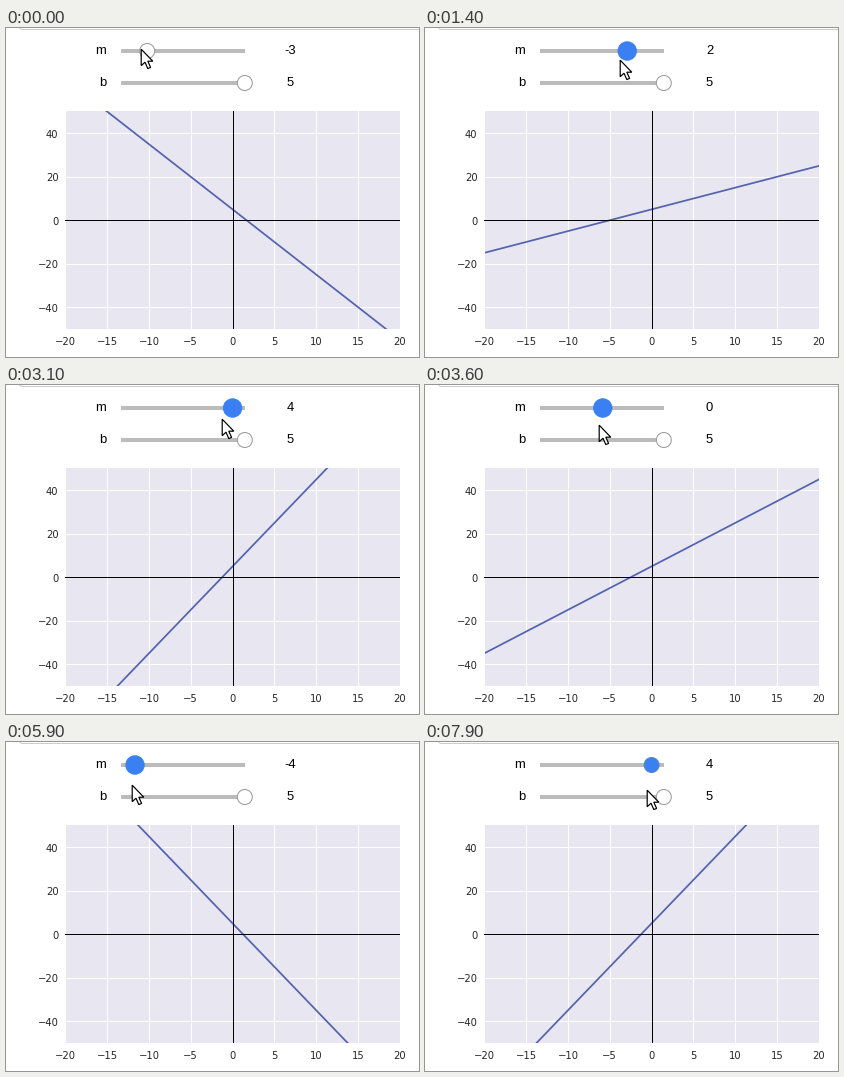
Recreate the animation shown at these times as a matplotlib script. Size 413 by 329 pixels, loop 8000 ms.

```python
import numpy as np
import matplotlib.pyplot as plt
from matplotlib.animation import FuncAnimation
from matplotlib.patches import Circle, PathPatch, Polygon, Rectangle
from matplotlib.path import Path

W, H, DPI = 413, 329, 64
PT = 72 / DPI  # points per pixel
STEP_MS, FRAMES = 100, 80
LEFT, RIGHT, TOP, BOTTOM = 59.2, 394, 83.5, 301
CENTER, STEP = 177.5, 12.2  # slider: pixel of zero, pixels per unit
GRIP = 7  # pointer tip to knob centre
LAG = 2  # the plot redraws this many steps after the slider
BLUE = "#3a80f2"

# Turning points of the pointer: step, x, y
STOPS, STOP_X, STOP_Y = zip(
    (4, 135, 20), (14, 195, 31), (18, 197, 31), (23, 216, 31), (30, 221, 32),
    (34, 200, 36), (36, 174, 39), (41, 162, 39), (44, 145, 39), (48, 144, 39),
    (50, 119, 41), (58, 118, 42), (62, 151, 43), (65, 152, 44), (70, 175, 45),
    (76, 214, 46), (79, 222, 47))

ARROW = np.array([(0, 0), (0, 16.5), (3.8, 13), (6.6, 19.4), (9.4, 18.2),
                  (6.6, 12), (11.6, 12)]) + (0.2, 1.2)


def px(x):
    return LEFT + (x + 20) / 40 * (RIGHT - LEFT)


def py(y):
    return BOTTOM - (y + 50) / 100 * (BOTTOM - TOP)


def pointer(i):
    return round(np.interp(i, STOPS, STOP_X)), round(np.interp(i, STOPS, STOP_Y))


def slider_value(i):
    return round((pointer(i)[0] + GRIP - CENTER) / STEP)


def knob_center(value, y):
    return CENTER + 0.3 + STEP * value, y


fig = plt.figure(figsize=(W / DPI, H / DPI), dpi=DPI, facecolor="white")
ax = fig.add_axes([0, 0, 1, 1])
ax.set(xlim=(0, W), ylim=(H, 0))
ax.axis("off")


def bar(x, y, w, h, color, z=1):
    return ax.add_patch(Rectangle((x, y), w, h, fc=color, lw=0, zorder=z))


def label(x, y, text, ha, size=13, font="Liberation Sans", color="black"):
    return ax.text(x, y, text, ha=ha, va="baseline", fontsize=size * PT,
                   family=font, color=color)


def tick(x, y, value, ha):
    label(x, y, str(value).replace("-", "\u2212"), ha, 10, "DejaVu Sans", "#262626")


def slider(name, value, y):
    label(100, y + 3, name, "right")
    bar(115, y - 2, 124, 4, "#bbbbbb")
    text = label(284.5, y + 3, str(value), "center")
    knob = Circle(knob_center(value, y), 7.5, fc="white", ec="#999999",
                  lw=PT, zorder=5)
    return text, ax.add_patch(knob)


# Panel border with a rounded corner
border = Path([(13.5, -1), (13.5, 1.5), (16.5, 1.5), (W, 1.5)], [1, 3, 3, 2])
ax.add_patch(PathPatch(border, fc="none", ec="#cccccc", lw=PT))

m_text, m_knob = slider("m", -3, 23)
slider("b", 5, 55)

# Plot area, with the zero lines above the curve
left, top = 60, 83
width, height = RIGHT - left, BOTTOM - top
area = bar(left, top, width, height, "#e8e7f1")
for v in range(-20, 21, 5):
    if abs(v) < 20:
        bar(round(px(v)), top, 1, height, "white", 2)
    tick(px(v), 317, v, "center")
for v in range(-40, 41, 20):
    bar(left, round(py(v)), width, 1, "white", 2)
    tick(52.5, py(v) + 4.5, v, "right")
bar(round(px(0)), top, 1, height, "black", 4)
bar(left - 1, round(py(0)), width + 1, 1, "black", 4)

line, = ax.plot([], [], color="#5363ad", lw=1.75 * PT, zorder=3)
line.set_clip_path(area)
arrow = ax.add_patch(Polygon(ARROW, fc="white", ec="black", lw=1.2 * PT,
                             joinstyle="miter", zorder=9))


def update(i):
    arrow.set_xy(ARROW + pointer(i))

    m = slider_value(i)
    m_text.set_text(str(m))
    m_knob.center = knob_center(m, 23)
    hovered, dragging = i >= 2, 5 <= i < FRAMES - 1
    m_knob.set_radius(9.2 if dragging else 7.5)
    m_knob.set_facecolor(BLUE if hovered else "white")
    m_knob.set_edgecolor(BLUE if dragging else "#5a86c8" if hovered else "#999999")

    ends = np.array([-20, 20])
    line.set_data(px(ends), py(slider_value(i - LAG) * ends + 5))
    return line, arrow, m_text, m_knob


anim = FuncAnimation(fig, update, frames=FRAMES, interval=STEP_MS,
                     repeat=True, repeat_delay=0)
plt.show()
```
